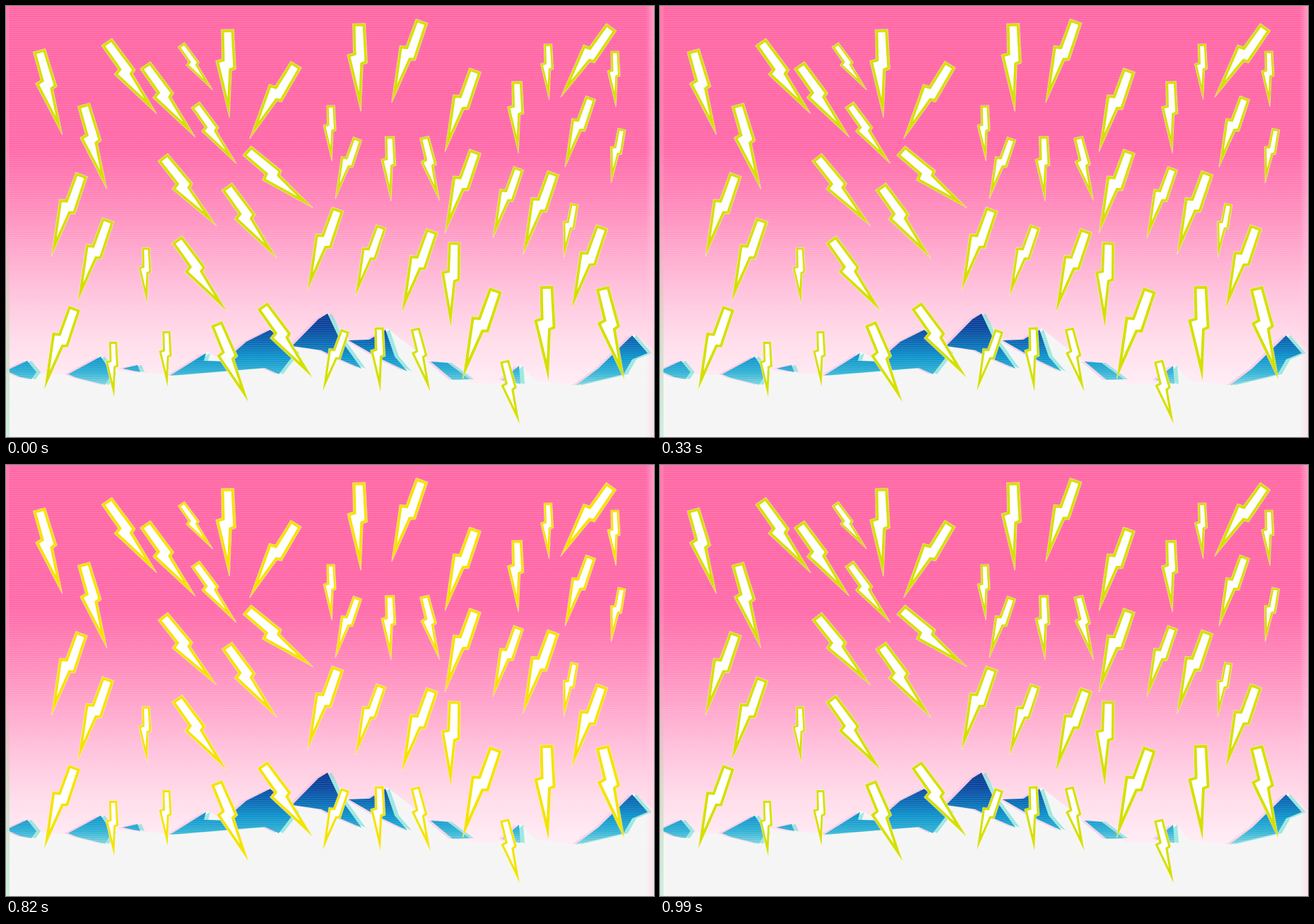
Recreate the animation shown at these times as an HTML page with a canvas. Size 917 by 611 pixels, loop 1290 ms.

```html
<!DOCTYPE html>
<html lang="en">
<head>
<meta charset="utf-8">
<title>Lightning over mountains</title>
<style>
html, body { margin: 0; width: 917px; height: 611px; overflow: hidden; background: #f5f5f5; }
canvas { display: block; }
</style>
</head>
<body>
<canvas id="stage" width="917" height="611"></canvas>
<script>
const W = 917, H = 611, LOOP = 1290;
const stage = document.getElementById('stage').getContext('2d');

function trace(g, points) {
  g.beginPath();
  points.forEach(([x, y]) => g.lineTo(x, y));
  g.closePath();
}

// Evenly spaced colours along a line
function gradient(g, box, colours) {
  const fill = g.createLinearGradient(...box);
  colours.forEach((colour, i) => fill.addColorStop(i / (colours.length - 1), colour));
  return fill;
}

const FACETS = [
  [[0, 517], [30, 503], [43, 519], [36, 529], [20, 526]],
  [[88, 522], [134, 497], [150, 521], [140, 537], [100, 527]],
  [[165, 514], [186, 509], [190, 519]],
  [[232, 524], [283, 492], [280, 503], [308, 504], [340, 476], [374, 459], [409, 492],
    [386, 522], [366, 513]],
  [[405, 482], [442, 444], [455, 436], [470, 468], [503, 514], [468, 499], [446, 488]],
  [[485, 474], [514, 473], [537, 459], [550, 497], [568, 518], [530, 500]],
  [[601, 504], [625, 506], [656, 529], [632, 530]],
  [[702, 530], [726, 510], [728, 536]],
  [[806, 538], [838, 514], [886, 467], [908, 492], [886, 501], [874, 522]],
];

function drawFacets(g, shift, fill) {
  g.save();
  g.translate(shift, 0);
  g.fillStyle = fill;
  FACETS.forEach(points => { trace(g, points); g.fill(); });
  g.restore();
}

function drawSnow(g) {
  trace(g, [[0, 519], [30, 503], [48, 521], [90, 523], [135, 496], [160, 518], [230, 522],
    [285, 490], [310, 504], [376, 457], [406, 482], [455, 436], [486, 474], [515, 472],
    [540, 457], [600, 504], [660, 535], [705, 535], [728, 508], [750, 531], [805, 538],
    [888, 465], [W, 490], [W, H], [0, H]]);
  g.fillStyle = '#f5f5f5';
  g.fill();
}

function paintScene() {
  const canvas = document.createElement('canvas');
  canvas.width = W;
  canvas.height = H;
  const g = canvas.getContext('2d');

  g.fillStyle = gradient(g, [0, 0, 0, 540], ['#ff68a5', '#ff68a5', '#ff68a6', '#ff6aa9',
    '#ff85b8', '#ffa3ca', '#ffc2dc', '#ffdcea', '#ffedf5']);
  g.fillRect(0, 0, W, H);
  drawSnow(g);

  // Colour fringes, then the rock itself
  drawFacets(g, -5, 'rgba(245,185,222,.55)');
  drawFacets(g, 6, 'rgba(95,222,210,.6)');
  drawFacets(g, 0, gradient(g, [0, 435, 0, 540],
    ['#0a3a90', '#0b469e', '#0b6ab4', '#0f94cc', '#32b2d5', '#8bdbe2']));

  // Scan lines
  g.fillStyle = 'rgba(255,255,255,.11)';
  for (let y = 1; y < 540; y += 3) g.fillRect(0, y, W, 1);

  // Tinted side edges
  g.fillStyle = gradient(g, [0, 0, 0, H], ['rgba(255,150,185,.35)', 'rgba(250,160,185,.35)',
    'rgba(240,170,190,.4)', 'rgba(212,220,198,.85)', '#ccefdf']);
  g.fillRect(0, 0, 5, H);
  g.fillStyle = gradient(g, [905, 0, W, 0], ['rgba(255,205,228,0)', 'rgba(255,205,228,.5)']);
  g.fillRect(905, 0, 12, H);
  return canvas;
}

// Unit bolt: x across, y from top centre (0) to tip (1)
const SHAPE = [[-.071, 0], [.071, 0], [.086, .45], [.035, .47],
  [0, 1], [-.14, .355], [-.07, .335]];

// Lean in degrees, then length and the top centres of the bolts of that length
const BOLTS = [
  { lean: 15.3, sizes: { 123.5: [[47, 63], [110, 140]] } },
  { lean: 13.4, sizes: {
    92: [[592, 186], [579, 457], [705.5, 503]],
    133.6: [[844, 399]] } },
  { lean: 22, sizes: { 120: [[298, 450]] } },
  { lean: 34.8, sizes: {
    123.5: [[142.5, 51], [197, 84], [242, 331], [312.5, 256], [363, 425]],
    101: [[268, 140]],
    77.7: [[248, 55]] } },
  { lean: 37.9, sizes: { 123: [[222, 214.5]] } },
  { lean: 49, sizes: { 123.3: [[341, 205]] } },
  { lean: 1.2, sizes: {
    124: [[313.5, 33.5], [499.5, 25]],
    134: [[765, 397]],
    101: [[723, 107]],
    91: [[543, 185], [528, 455.5]],
    78.5: [[459.5, 141], [767, 54], [861.5, 64], [198, 342.5], [151.5, 476], [227, 461]] } },
  { lean: -2.4, sizes: { 120: [[634.5, 335]] } },
  { lean: -32, sizes: { 123.7: [[410.5, 83]] } },
  { lean: -35.8, sizes: { 122: [[856.5, 30]] } },
  { lean: -20.3, sizes: {
    123: [[588.5, 21.5], [664, 91], [664, 206], [774.5, 236.5], [843.5, 313],
      [107, 239], [144.5, 303], [469.5, 288], [603, 318.5], [97, 428]],
    134.3: [[693, 402]],
    104.7: [[827.5, 130], [725.5, 230], [531, 312.5]],
    90.5: [[497.5, 188], [480, 460]] } },
  { lean: -11.2, sizes: { 77.5: [[871.5, 174.5], [804.5, 280.5]] } },
];

function drawBolt(g, [x, y], lean, length, ring) {
  const dx = length * Math.sin(lean), dy = length * Math.cos(lean);
  const points = SHAPE.map(([u, v]) => [x + u * dy + v * dx, y - u * dx + v * dy]);
  const xs = points.map(p => p[0]);
  trace(g, points);
  g.lineJoin = 'round';
  g.lineWidth = 1.4;
  g.strokeStyle = ring ? 'rgba(255,240,215,.55)' : 'rgba(255,235,244,.75)';
  g.stroke();
  g.fillStyle = '#fff';
  g.fill();

  // The clip keeps only the inner half of the stroke
  g.save();
  g.clip();
  g.lineJoin = 'miter';
  g.lineWidth = 2.4 + .042 * length;
  g.strokeStyle = ring || gradient(g, [Math.min(...xs), 0, Math.max(...xs), 0],
    ['#ff78b0', '#ffaed0', '#fff4f9']);
  g.stroke();
  g.restore();
}

function drawBolts(g, ring) {
  for (const { lean, sizes } of BOLTS)
    for (const [length, tops] of Object.entries(sizes))
      tops.forEach(top => drawBolt(g, top, lean * Math.PI / 180, +length, ring));
}

// Start in ms and ring colour; null is the unlit flash
const LIME = '#d5e000', YELLOW = '#f5e300';
const STEPS = [[0, LIME], [230, null], [330, LIME], [590, YELLOW],
  [720, null], [820, YELLOW], [920, null], [990, LIME]];

const scene = paintScene();
let shown;

function frame(now) {
  const t = now % LOOP;
  const ring = STEPS.filter(([start]) => start <= t).pop()[1];
  if (ring !== shown) {
    shown = ring;
    stage.drawImage(scene, 0, 0);
    drawBolts(stage, ring);
  }
  requestAnimationFrame(frame);
}
frame(0);
</script>
</body>
</html>
```
